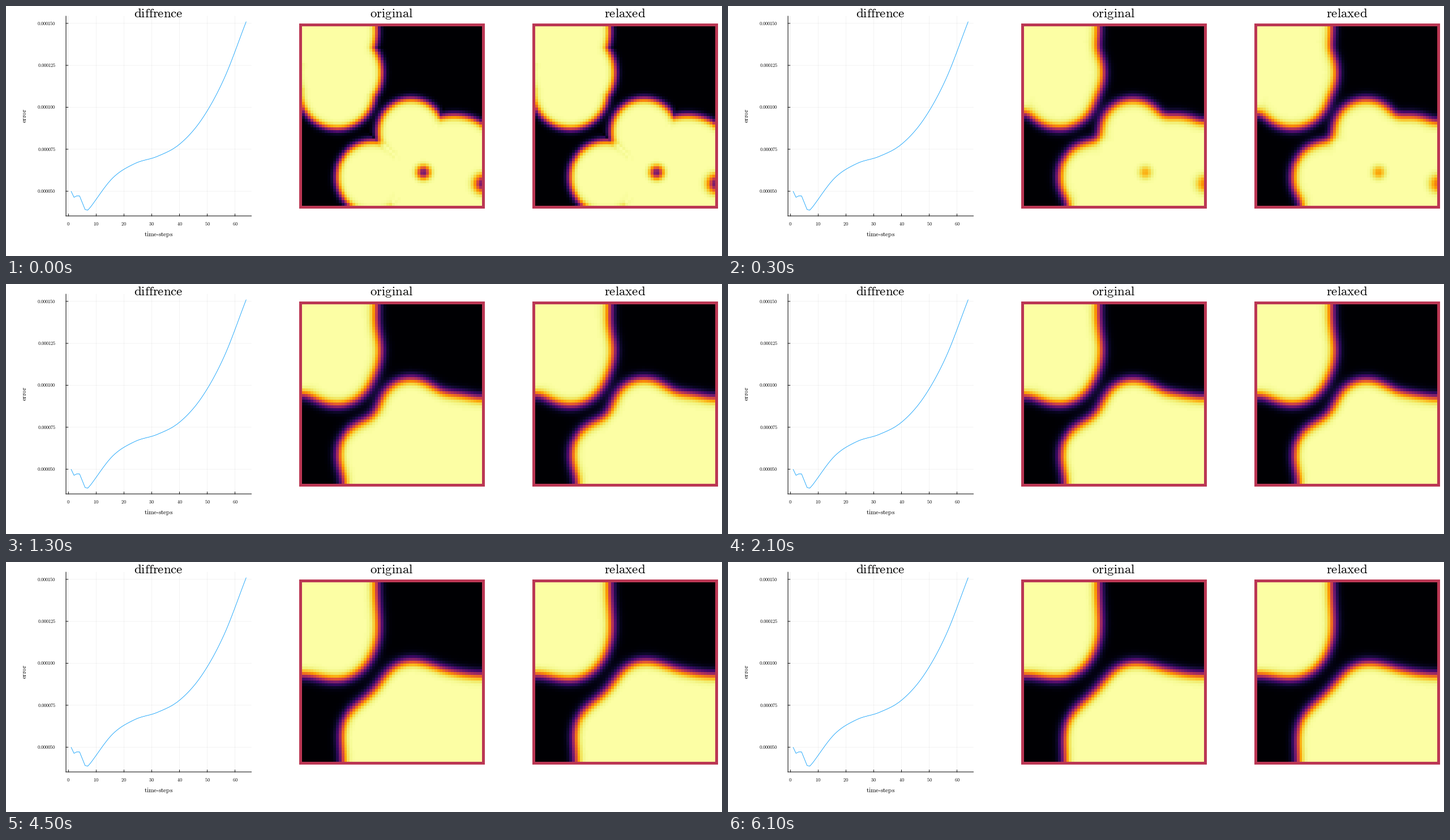
Write a matplotlib script that moves like this. It is 1265 by 443 pixels and loops after 6400 ms.

```python
import numpy as np
import matplotlib.pyplot as plt
from matplotlib.animation import FuncAnimation

W, H, DPI = 1265, 443, 64
FRAMES, STEP = 64, 100
N = 64                        # cells per side, inside a one-cell rim
CELL = 4.965
LEFT, TOP, SHIFT = 523.0, 36.0, 412.0

plt.rcParams["mathtext.fontset"] = "cm"
plt.rcParams["font.family"] = "Liberation Serif"

# Each region begins as a union of discs: x, y, radius in pixels.
UPPER = [(570, 45, 86), (588, 118, 77), (585, 150, 68)]
LOWER = [(715, 223, 59), (792, 277, 84), (648, 303, 65), (745, 300, 75),
         (780, 390, 115)]

centers = (np.arange(N) + 0.5) * CELL
GX, GY = np.meshgrid(LEFT + centers, TOP + centers)


def union(discs):
    """Height in cells, positive inside any disc."""
    return np.max([r - np.hypot(GX - x, GY - y) for x, y, r in discs],
                  axis=0) / CELL


def blur_matrix(sigma):
    """Gaussian weights with mirrored walls."""
    i, j = np.indices((N, N))
    k = sum(np.exp(-0.5 * (d / sigma)**2)
            for d in (i - j, i + j + 1, 2 * N - 1 - i - j))
    return k / k.sum(axis=1, keepdims=True)


def relax(height, blur):
    """Smooth the outline and restore a unit slope across it."""
    soft = blur @ height @ blur.T
    gy, gx = np.gradient(soft)
    return soft / np.maximum(np.hypot(gx, gy), 0.4)


def phase(t):
    blur = blur_matrix(max(0.3, 7.2 * (t / 6.1)**0.4))
    width = 1.4 + 0.5 * (1 - np.exp(-t / 0.2))
    return 1 + 0.5 * sum(np.tanh(relax(h, blur) / width) for h in REGIONS)


def hole(t, x, y, depth, radius, life):
    amount = depth * np.exp(-(t / life)**1.6)
    return amount * np.exp(-((GX - x)**2 + (GY - y)**2) / radius**2)


def panel(base, t, linger):
    v = (base - hole(t, 737, 295, 0.7, 10.5, 0.25 * linger)
         - hole(t, 843, 315, 0.74, 14, 0.3 * linger))
    return np.pad(np.clip(v, 0, 1), 1, constant_values=0.5)


def spline(pts, n=10):
    """Catmull-Rom curve through the points."""
    p = np.vstack([2 * pts[0] - pts[1], pts, 2 * pts[-1] - pts[-2]])
    a, b, c, d = (p[i:len(p) - 3 + i, None] for i in range(4))
    u = np.linspace(0, 1, n, endpoint=False)[None, :, None]
    curve = 0.5 * (2 * b + (c - a) * u + (2 * a - 5 * b + 4 * c - d) * u**2
                   + (3 * b - a - 3 * c + d) * u**3)
    return np.vstack([curve.reshape(-1, 2), pts[-1]])


def px(n):
    return n * 72 / DPI


REGIONS = [union(UPPER), union(LOWER)]
fig = plt.figure(figsize=(W / DPI, H / DPI), dpi=DPI, facecolor="white")
ax = fig.add_axes([0, 0, 1, 1])
ax.set_axis_off()


def roman(x, y, s, size, **kw):
    kw = {"ha": "center", "va": "baseline", **kw}
    s = "-".join(r"$\mathrm{%s}$" % part for part in s.split("-"))
    ax.text(x, y, s, fontsize=px(size), color="black", **kw)


def stroke(xs, ys, color="black", lw=1.0, **kw):
    ax.plot(xs, ys, color=color, lw=px(lw), snap=False, **kw)


def step_x(n):
    return 110.3 + 4.905 * np.asarray(n)


def draw_chart():
    x0, x1, y0, y1 = 106, 433.5, 372, 18
    for n in range(0, 70, 10):
        x = step_x(n)
        stroke([x, x], [y0, y1], alpha=0.08, lw=0.6)
        stroke([x, x], [y0, y0 - 3.6], lw=0.9)
        roman(x, 388.8, str(n), 8.2)
    for k in range(5):
        y = 328.2 - 74.35 * k
        stroke([x0, x1], [y, y], alpha=0.08, lw=0.6)
        stroke([x0, x0 + 3.6], [y, y], lw=0.9)
        roman(88, y + 2.8, "%.6f" % (5e-5 + 2.5e-5 * k), 8.2, ha="right")
    stroke([x0, x0], [y0, y1])
    stroke([x0, x1], [y0, y0])

    dip = [328.5, 339, 336.5, 336.5, 348.5, 360.7, 361.7]
    rise = [356, 304.5, 279, 266.5, 245, 201, 129.5, 28]
    smooth = spline(np.column_stack([np.arange(8, 65, 8), rise]))
    xs = np.r_[np.arange(1, 8), smooth[:, 0]]
    stroke(step_x(xs), np.r_[dip, smooth[:, 1]], "#009afa", 0.8)

    roman(269.5, 408.5, "time-steps", 11.1)
    roman(33, 194.5, "error", 11.1, rotation=90, va="center")


def draw_panel(x):
    x0, y0, size = x - CELL, TOP - CELL, (N + 2) * CELL
    return ax.imshow(np.zeros((N + 2, N + 2)), cmap="inferno", vmin=0, vmax=1,
                     extent=[x0, x0 + size, y0 + size, y0], aspect="auto",
                     interpolation="nearest", zorder=3)


draw_chart()
for x, title in ((269.5, "diffrence"), (681.5, "original"),
                 (1094, "relaxed")):
    roman(x, 19.6, title, 22.9)
left = draw_panel(LEFT)
right = draw_panel(LEFT + SHIFT)
ax.set_xlim(0, W)
ax.set_ylim(H, 0)


def update(i):
    t = i * STEP / 1000
    base = phase(t)
    left.set_data(panel(base, t, 1.0))
    right.set_data(panel(base, t, 1.08))
    return left, right


anim = FuncAnimation(fig, update, frames=FRAMES, interval=STEP, repeat=True,
                     repeat_delay=0, blit=False)
plt.show()
```
